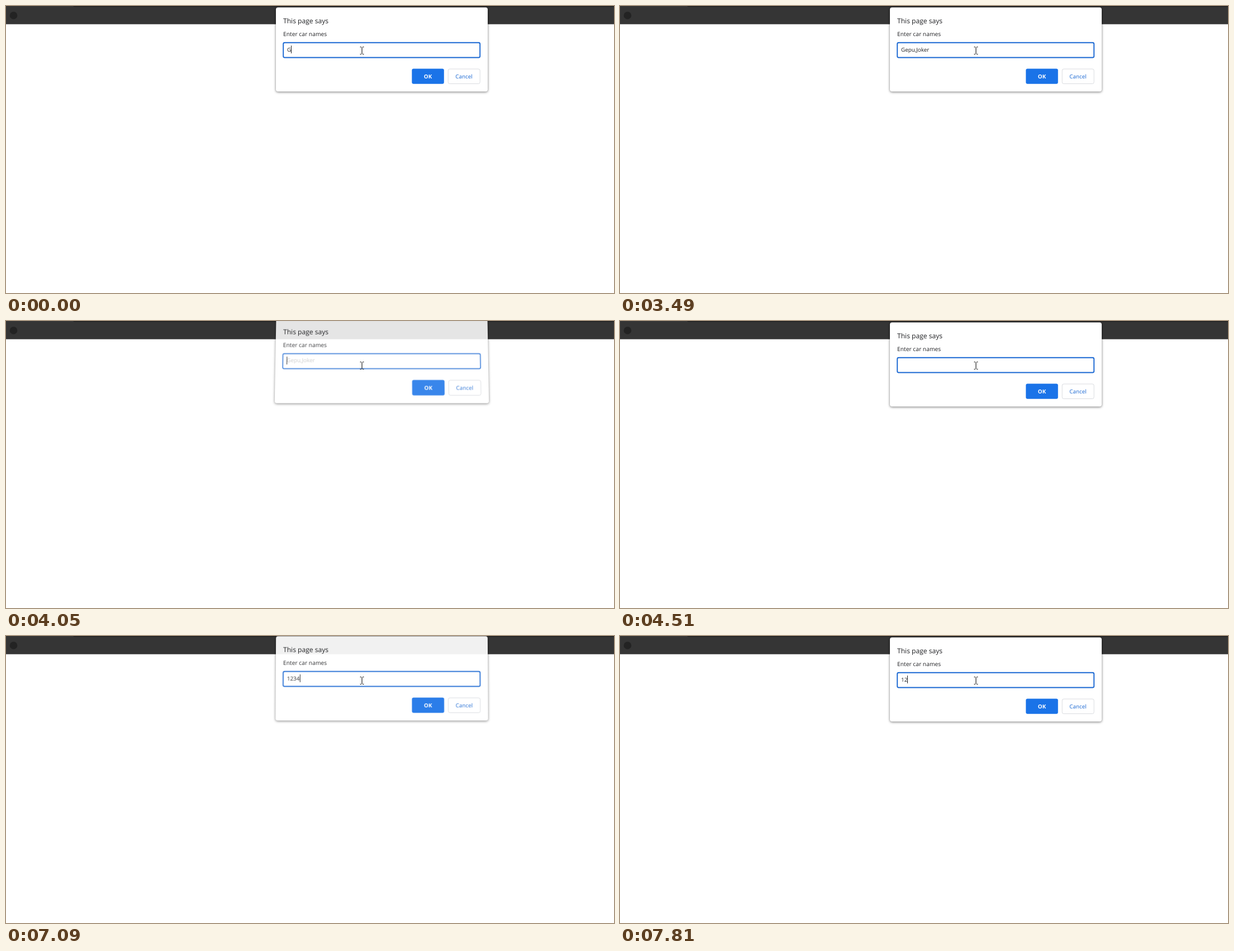
Animation of 1088 by 515 pixels, one loop 8 s. Source, as an HTML page:

```html
<!DOCTYPE html>
<html lang="en">
<head>
<meta charset="utf-8">
<title>Prompt dialog</title>
<style>
  html, body { margin: 0; width: 100%; height: 100%; overflow: hidden; background: #fff; }
  #stage { position: absolute; inset: 0; overflow: hidden; contain: strict; }
  svg { position: absolute; left: 0; top: 0; }
  text { font-family: "Open Sans", "Noto Sans", sans-serif; fill: #202124; text-rendering: geometricPrecision; white-space: pre; }
  #dialog { transform-origin: 672px 30px; }
  .panel { fill: #fff; filter: drop-shadow(0 1px 2px rgba(0, 0, 0, .55)); }
  .title { font-size: 12.1px; }
  .label { font-size: 10.3px; }
  .field { font-size: 9.85px; }
  .button { font-size: 9.8px; text-anchor: middle; }
</style>
</head>
<body>
<div id="stage">
  <svg width="1088" height="40">
    <rect width="1088" height="32.7" fill="#353535"/>
    <path d="M120 0H1088V1.5H123Q121 1.5 120 0Z" fill="#202020"/>
    <circle cx="13.5" cy="17" r="6.8" fill="#232323"/>
  </svg>

  <svg id="dialog" width="900" height="200">
    <rect class="panel" x="483" y="2.5" width="379" height="151" rx="4"/>
    <text class="title" x="496" y="30.5">This page says</text>
    <text class="label" x="496" y="54.3">Enter car names</text>
    <rect id="ring" x="496.2" y="65.7" width="352" height="26.8" rx="2.5" fill="#fff" stroke="#1967d2" stroke-width="1.9"/>
    <text class="field" id="ghost" x="503" y="81" style="fill:#c8c8c8"></text>
    <text class="field" id="value" x="503" y="82"></text>
    <rect id="caret" y="71" width="1" height="14" fill="#202124"/>
    <rect x="726.3" y="112.6" width="57.5" height="27.2" rx="3" fill="#1a73e8"/>
    <text class="button" x="755" y="129.7" style="fill:#fff;font-weight:700">OK</text>
    <rect x="791.2" y="113" width="57" height="26.5" rx="3" fill="#fff" stroke="#dadce0"/>
    <text class="button" x="819.5" y="129.7" style="fill:#1967d2;font-weight:500">Cancel</text>
  </svg>

  <svg width="700" height="100">
    <path d="M633.5 73.5H636M638 73.5H640.5M633.5 86.5H636M638 86.5H640.5M637 74V86" fill="none" stroke="#222" stroke-width="1.2"/>
  </svg>
</div>

<script>
const LOOP = 8000, NAMES = "Gepu,Joker", DIGITS = "1234";
const $ = id => document.getElementById(id);
const dialog = $("dialog"), ring = $("ring"), value = $("value"), ghost = $("ghost"), caret = $("caret");

const steps = [];
const step = (time, text, options) =>
  steps.push({ time, text, caretOn: true, tilt: 0, alpha: 1, ghost: "", ...options });
const type = (text, times, from = 1) =>
  times.forEach((time, i) => step(time, text.slice(0, from + i)));

type(NAMES, [0, 210, 460, 710, 1010]);
step(1570, NAMES.slice(0, 5), { caretOn: false });
type(NAMES, [1710, 1930, 2190, 2550, 2940], 6);
step(3490, NAMES, { caretOn: false });

// The dialog closes and opens again.
step(3970, NAMES, { caretOn: false, tilt: .3, alpha: .93 });
step(4050, "", { tilt: 1, alpha: .87, ghost: NAMES });
step(4120, "");
step(4510, "", { caretOn: false });
step(4980, "");
step(5530, "", { caretOn: false });
type(DIGITS, [5850, 6170, 6400, 6660]);

step(7090, DIGITS, { tilt: .3, alpha: .93 });
step(7180, "", { tilt: .7, alpha: .87, ghost: DIGITS });
step(7270, "", { tilt: .1, alpha: .9 });
step(7340, "");
type(DIGITS, [7590, 7810]);

function draw() {
  const t = performance.now() % LOOP;
  const s = steps.findLast(s => s.time <= t);
  value.textContent = s.text;
  ghost.textContent = s.ghost;
  caret.setAttribute("x", Math.round(503 + (s.text ? value.getComputedTextLength() : 0)));
  caret.setAttribute("visibility", s.caretOn ? "visible" : "hidden");
  ring.setAttribute("stroke-opacity", 1 - .2 * s.tilt);
  dialog.style.opacity = s.alpha;
  dialog.style.transform = s.tilt
    ? `translateY(${-7.2 * s.tilt}px) perspective(600px) rotateX(${3.2 * s.tilt}deg)`
    : "none";
  requestAnimationFrame(draw);
}
draw();
</script>
</body>
</html>
```
